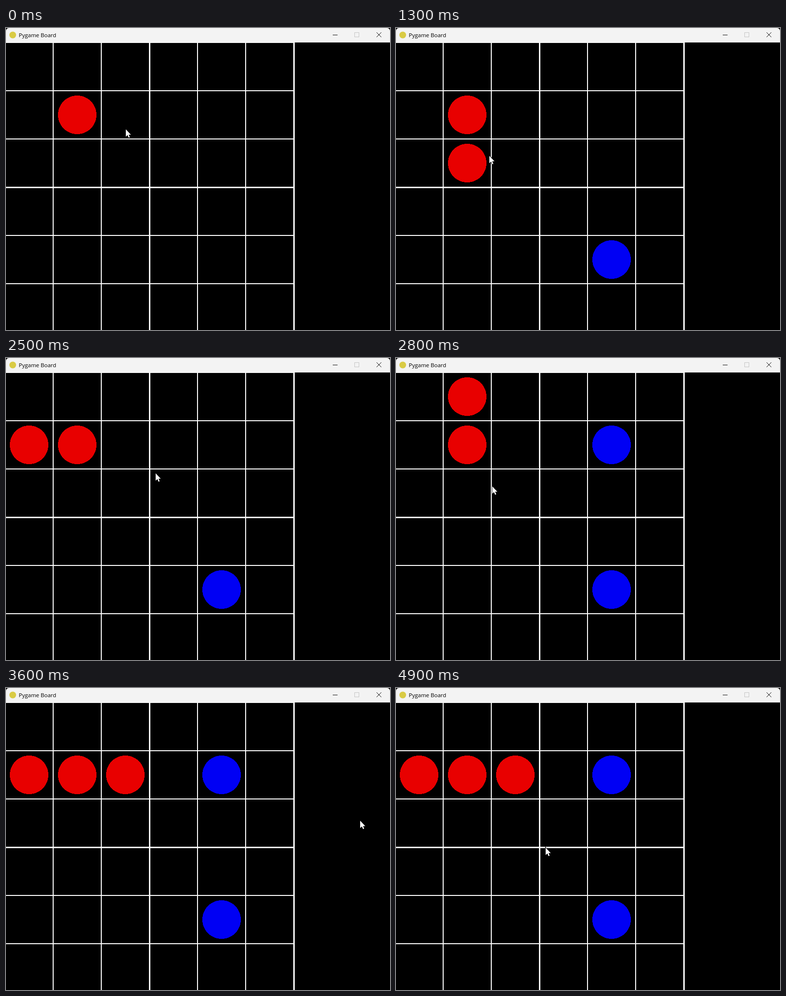
An HTML page with a canvas that plays this animation: 798x626 px, repeating every 5 s.

```html
<!DOCTYPE html>
<html lang="en">
<head>
<meta charset="utf-8">
<title>Pygame Board</title>
<style>
  html, body { margin: 0; width: 100%; height: 100%; overflow: hidden; background: #000; }
  canvas { display: block; }
</style>
</head>
<body>
<canvas id="stage" width="798" height="626"></canvas>
<script>
const ctx = document.getElementById('stage').getContext('2d');
const LOOP = 5000, STEP = 100;
const BOARD_X = -2, BOARD_Y = 30, CELL = 100, RADIUS = 40;
const RED = '#e80000', BLUE = '#0000f4';

const moves = [
  { at: 0, col: 1, row: 1, color: RED },
  { at: 600, col: 4, row: 4, color: BLUE },
  { at: 1200, col: 1, row: 2, color: RED },
  { at: 2800, col: 4, row: 1, color: BLUE },
  { at: 3200, col: 1, row: 2, color: RED }
];

// Times at which the top-left quadrant turns clockwise
const turns = [1700, 2800, 3600];

// Where the pointer arrives, and when
const stops = [
  { at: 0, x: 249, y: 210 },
  { at: 300, x: 252, y: 217 },
  { at: 700, x: 252, y: 217 },
  { at: 900, x: 359, y: 353 },
  { at: 1200, x: 165, y: 275 },
  { at: 1300, x: 194, y: 265 },
  { at: 1800, x: 737, y: 271 },
  { at: 2500, x: 311, y: 239 },
  { at: 3200, x: 175, y: 272 },
  { at: 3300, x: 229, y: 273 },
  { at: 3600, x: 736, y: 275 },
  { at: 3900, x: 590, y: 416 },
  { at: 4100, x: 466, y: 360 },
  { at: 4900, x: 311, y: 331 }
];

const arrow = new Path2D('M0 0V15.2L3.6 12L6 17.4L8.3 16.4L6 11.2H10.6Z');
const easeOut = k => 1 - (1 - k) ** 3;

function rect(x, y, w, h, color) {
  ctx.fillStyle = color;
  ctx.fillRect(x, y, w, h);
}

function line(x0, y0, x1, y1) {
  ctx.beginPath();
  ctx.moveTo(x0, y0);
  ctx.lineTo(x1, y1);
  ctx.stroke();
}

function drawTitleBar() {
  ctx.fillStyle = '#f3f3f3';
  ctx.beginPath();
  ctx.roundRect(0, 0, 798, 30, [6, 6, 0, 0]);
  ctx.fill();

  ctx.fillStyle = '#d9cb45';
  ctx.beginPath();
  ctx.arc(14, 14.5, 7, 0, 2 * Math.PI);
  ctx.fill();

  ctx.fillStyle = '#000';
  ctx.font = '11.5px "Open Sans", sans-serif';
  ctx.fillText('Pygame Board', 26.5, 19);

  rect(679, 14, 10, 1, '#111');
  ctx.lineWidth = 1;
  ctx.strokeStyle = '#c6c6c6';
  ctx.strokeRect(724.5, 9.5, 9, 9);
  ctx.strokeStyle = '#111';
  line(770, 9, 780, 19);
  line(780, 9, 770, 19);
}

function drawGrid() {
  rect(0, BOARD_Y, 600, 1, '#fff');
  for (let i = 1; i <= 6; i++) {
    const width = i % 3 ? 2 : 3;
    rect(BOARD_X + i * CELL - 1, BOARD_Y, width, 596, '#fff');
    if (i < 6) rect(0, BOARD_Y + i * CELL - 1, 600, width, '#fff');
  }
}

// Hard-edged disc, one pixel row at a time
function drawPiece(col, row, color) {
  const x = BOARD_X + (col + 0.5) * CELL;
  const y = BOARD_Y + (row + 0.5) * CELL;
  for (let dy = -RADIUS; dy < RADIUS; dy++) {
    const half = Math.round(Math.sqrt(RADIUS ** 2 - (dy + 0.5) ** 2));
    rect(x - half, y + dy, 2 * half, 1, color);
  }
}

function drawPieces(t) {
  for (const { at, col, row, color } of moves) {
    if (t < at) continue;
    let cell = [col, row];
    if (col < 3 && row < 3) {
      for (const turn of turns) {
        if (turn > at && turn <= t) cell = [2 - cell[1], cell[0]];
      }
    }
    drawPiece(...cell, color);
  }
}

function drawPointer(t) {
  const next = stops.findIndex(stop => stop.at > t);
  const to = stops.at(next);
  const from = next > 0 ? stops[next - 1] : to;
  const k = to === from ? 1 : easeOut((t - from.at) / (to.at - from.at));
  ctx.save();
  ctx.translate(Math.round(from.x + (to.x - from.x) * k), Math.round(from.y + (to.y - from.y) * k));
  ctx.lineWidth = 2;
  ctx.strokeStyle = '#000';
  ctx.stroke(arrow);
  ctx.fillStyle = '#fff';
  ctx.fill(arrow);
  ctx.restore();
}

function draw(now) {
  const t = Math.floor((now % LOOP) / STEP) * STEP;
  rect(0, 0, 798, 626, '#000');
  drawTitleBar();
  drawGrid();
  drawPieces(t);
  drawPointer(t);
}

const start = performance.now();
function tick() {
  draw(performance.now() - start);
  requestAnimationFrame(tick);
}
tick();
</script>
</body>
</html>
```
